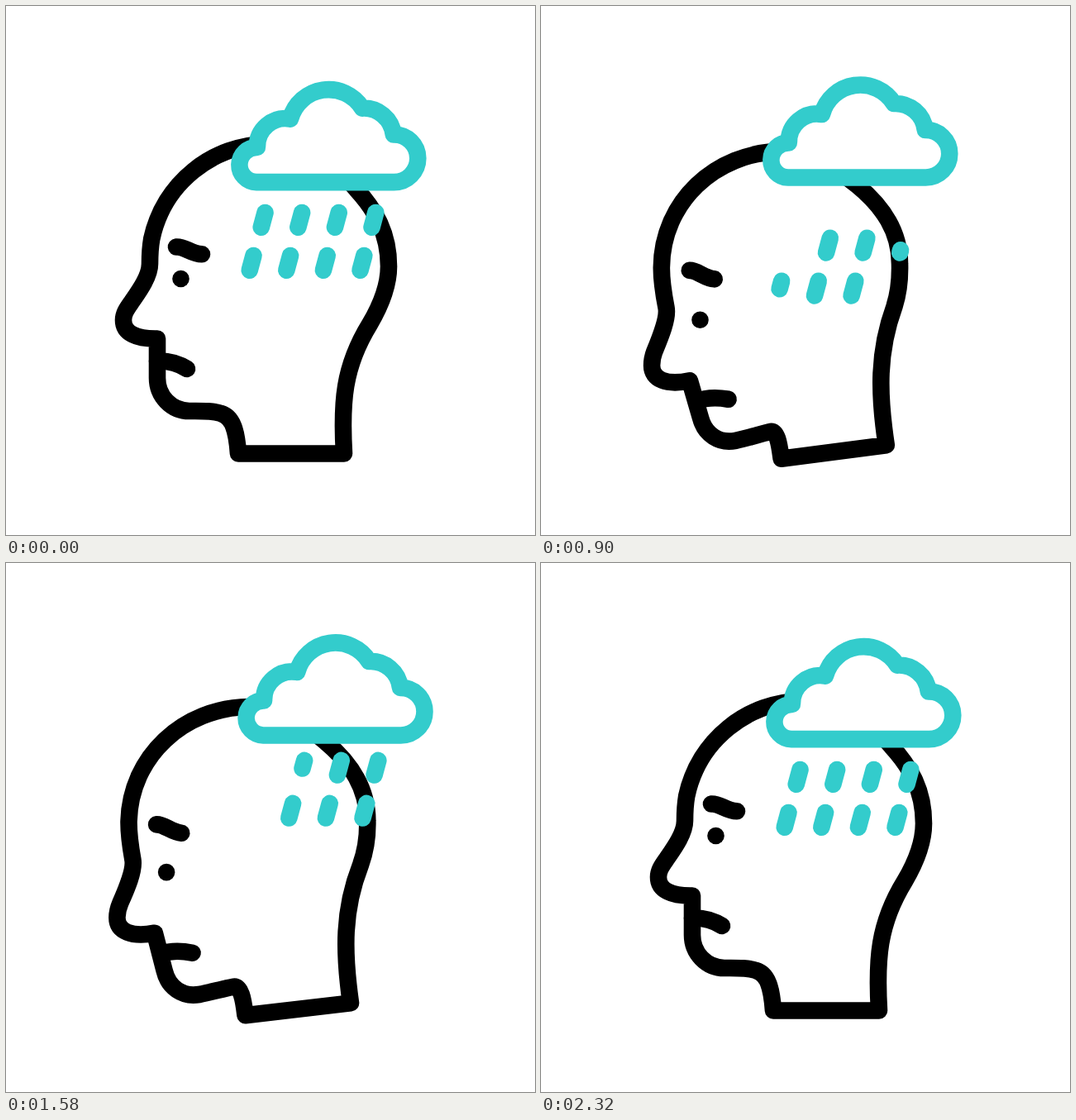
Write an HTML page that moves like this. It is 640 by 640 pixels and loops after 2.4 s.

```html
<!DOCTYPE html>
<html lang="en">
<head>
<meta charset="utf-8">
<title>Rain cloud over a sad head</title>
<style>
html, body { margin: 0; width: 100%; height: 100%; overflow: hidden; background: #fff; }
svg { display: block; width: 100%; height: 100%; }
path, line { fill: none; stroke-width: 20.6; stroke-linecap: round; stroke-linejoin: round; }
.ink path { stroke: #000; }
#rain line, #cloud { stroke: #33cccc; }
#cloud { fill: #fff; }
</style>
</head>
<body>
<svg viewBox="0 0 640 640">
  <g class="ink">
    <path id="head"/>
    <path id="brow"/>
    <path id="mouth"/>
    <circle id="eye" r="10.3"/>
  </g>
  <g id="rain"></g>
  <path id="cloud" d="M303 213.1H469.5A28.8 28.8 0 0 0 498.3 184.3A28.8 28.8 0 0 0 468.8 155.5A36 36 0 0 0 431 123.6A48 48 0 0 0 344 136.6A34 34 0 0 0 303.9 171A21 21 0 1 0 303 213.1Z"/>
</svg>
<script>
const LOOP = 2400, TICK = 20, LAST = 2320;
const $ = id => document.getElementById(id);
const clamp = v => Math.min(1, Math.max(0, v));
const ease = (t, a, b) => { const k = clamp((t - a) / (b - a)); return k * k * (3 - 2 * k); };
const mix = (a, b, k) => a + (b - a) * k;

// Each shape: upright pose, bowed pose (same commands).
const shapes = {
  head: [
    `M281,541.5 L409,541.5 C405.5,480 408,437 440,385 C453,363 463,340 463,315
     C463,275 447,247 424,222 C395,185 358,167 318,167 C249.5,167 190.4,215 176.2,282
     C174.5,292 174,302 174,312 C174,327 161,345 152,358 C146,366.5 142,372 142,380
     C142,396 158,403 183,402.5 L183,450 C183,472 200,490 222,490
     C237,490 250,489.5 260,493 C274,497 279,513 281,541.5 Z`,
    `M291,548 L418,531 C408.3,468 407.3,418 427,363 C432,347 433.5,330 433,312
     C433,273 413,243 381,217 C354,195 325,177 290,176.5 C210,177.5 145,238 145,318
     C145,336 148,352 151,367 C153.5,380 144,403 137,420 C135,425.5 134,431 134,437
     C134,454 152,461 180,455 L193.5,500 C199,520 216,531 236,527
     C250,524 265,519 277,516 C286,513 288.5,529 291,548 Z`],
  brow: ['M206,291.5 C216,290.5 224,300 237,300.3', 'M179,321 C188,320.5 197,330.5 209,331.5'],
  mouth: ['M183,429.5 C196,429 208,432 219,439', 'M188,480 C200,475 214,475 227,477']
};
const pair = /(-?[\d.]+),(-?[\d.]+)/g;
const points = d => [...d.matchAll(pair)].map(m => [+m[1], +m[2]]);
for (const id in shapes) {
  const [up, down] = shapes[id];
  shapes[id] = { up, a: points(up), b: points(down) };
}

// Points travel on shallow arcs around the base of the neck.
const PIVOT = [345, 541], ARC = 0.028;
const between = (a, b, k) =>
  a.map((v, i) => mix(v, b[i], k) + ARC * k * (1 - k) * (v - PIVOT[i]));

function drawHead(t) {
  const k = ease(t, 173, 985) - ease(t, 1420, 2127);
  for (const id in shapes) {
    const { up, a, b } = shapes[id];
    let i = 0;
    $(id).setAttribute('d', up.replace(pair, () => {
      const p = between(a[i], b[i], k);
      i++;
      return p.map(v => v.toFixed(2)).join(',');
    }));
  }
  const [x, y] = between([211.5, 330], [192, 381.5], k);
  $('eye').setAttribute('cx', x);
  $('eye').setAttribute('cy', y);
}

function drawCloud(t) {
  const x = -8.4 * ease(t, 0, 600) + 16.8 * ease(t, 600, 1500) - 8.4 * ease(t, 1500, 2320);
  const y = -5.6 * (ease(t, 0, 890) - ease(t, 1340, 2260));
  $('cloud').setAttribute('transform', `translate(${x} ${y})`);
}

// Three showers; drops grow and vanish one by one from right to left.
const STEP = 73, LENGTH = 17.7, SLANT = -0.27;
const showers = [
  { from: 0, to: 52, start: 60, end: 768, grow: -1000, wipe: 38 },
  { from: -30, to: 52, start: 400, end: 1150, grow: 423, wipe: 767 },
  { from: -30, to: 0, start: 1170, end: 1870, grow: 1175, wipe: Infinity }
];
for (const s of showers) {
  s.drops = Array.from({ length: 8 }, () =>
    $('rain').appendChild(document.createElementNS('http://www.w3.org/2000/svg', 'line')));
}

function drawRain(t) {
  for (const s of showers) {
    const fall = mix(s.from, s.to, ease(t, s.start, s.end));
    s.drops.forEach((drop, i) => {
      const tail = clamp((t - s.wipe) / STEP - i);
      const tip = clamp((t - s.grow) / STEP - i);
      const shown = tip > tail;
      drop.setAttribute('visibility', shown ? 'visible' : 'hidden');
      if (!shown) return;
      const left = 313.5 + 44.6 * (3 - (i >> 1));
      const top = fall + (i % 2 ? 0 : 52);
      [tail, tip].forEach((k, n) => {
        const dy = top + k * LENGTH;
        drop.setAttribute('x' + (n + 1), left + SLANT * dy);
        drop.setAttribute('y' + (n + 1), 250 + dy);
      });
    });
  }
}

function draw(now) {
  const t = Math.min(LAST, Math.floor((now % LOOP) / TICK) * TICK);
  drawHead(t);
  drawCloud(t);
  drawRain(t);
}

let begin;
function frame(now) {
  begin ??= now;
  draw(now - begin);
  requestAnimationFrame(frame);
}
draw(0);
requestAnimationFrame(frame);
</script>
</body>
</html>
```
